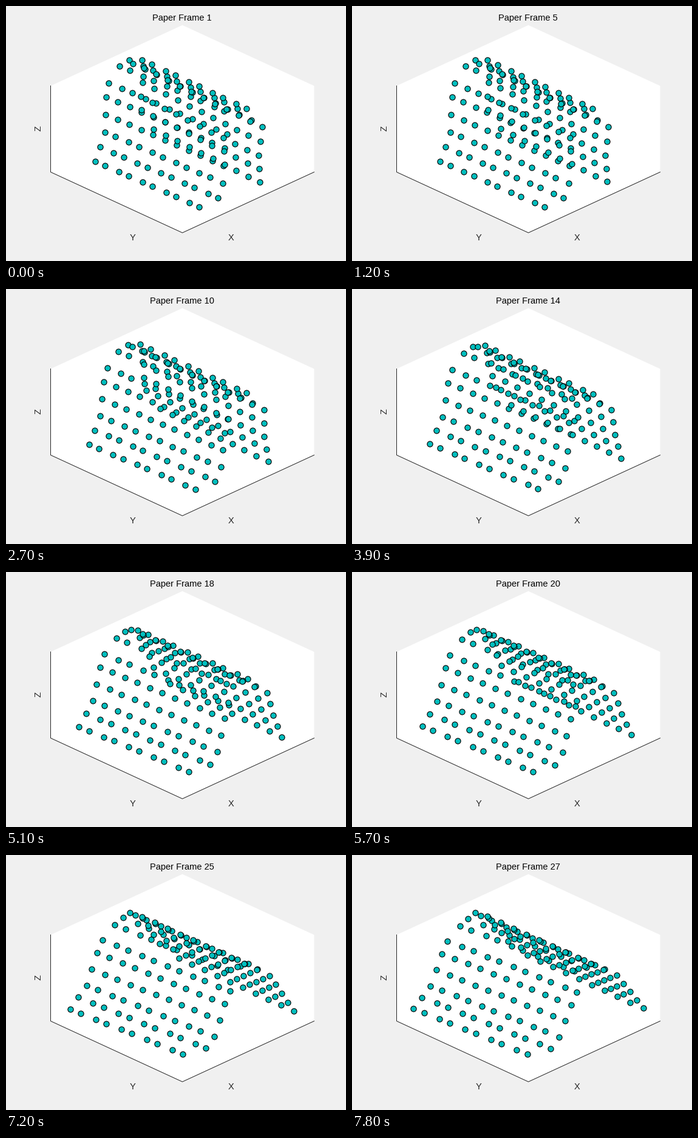
These frames come from a looping animation (560 px wide and 420 px high, 8000 ms). A matplotlib script:

```python
import numpy as np
import matplotlib.pyplot as plt
from matplotlib.animation import FuncAnimation

W, H, DPI = 560, 420, 100
PX = 72 / DPI  # one pixel in points
INK = "#262626"
ROWS = 15
RIDGE = ROWS // 2

# Key points of the sheet's two outer edges, folded and opened.
# The near slope hangs from its back edge, the far slope from its front edge.
BACK_ROWS = [0, 2, 4, 5, 6, 7]
BACK = np.array([
    [(147, 256), (163, 207), (165, 149), (169, 126), (187, 98), (203, 88)],
    [(101, 253), (129, 215), (148, 162), (157, 141), (178, 116), (191, 104)]])
FRONT_ROWS = [8, 9, 10, 12, 14]
FRONT = np.array([
    [(395, 168), (403, 188), (421, 199), (415, 246), (417, 290)],
    [(399, 180), (415, 188), (435, 198), (457, 225), (479, 252)]])


def mix(a, b, s):
    return a + (b - a) * s


def opening(step):
    """Slow start that runs into a steady rate; 0 is folded, 1 is open."""
    line = 1 - 0.0455 * (27 - step)
    return (line + np.sqrt(line * line + 0.0088)) / 2


def edge_point(row, key_rows, poses, s):
    keys = mix(poses[0], poses[1], s)
    return np.array([np.interp(row, key_rows, axis) for axis in keys.T])


def row_points(row, s):
    # The sheet's borders and ridge have one vertex less.
    last = 9 if abs(row - RIDGE) in (0, 1, RIDGE) else 10
    col = np.arange(last + 1)
    # Odd vertices pair up with a neighbour, the other way on every next row.
    slip = 0.17 * (-1) ** row * abs(np.cos(np.pi * row / RIDGE))
    if row > RIDGE + 1:
        slip = 0
    place = (col - slip * (col % 2)) / 10
    along = np.array([mix(194, 212, s), np.interp(row, [6, 10], [84, 97])])
    if row <= RIDGE:
        anchor = edge_point(row, BACK_ROWS, BACK, s)
    else:
        anchor = edge_point(row, FRONT_ROWS, FRONT, s)
        anchor[1] += 4 * s * (1 - s) * max(0, row - 10)  # sag while opening
        place = place - place[-1]
    return anchor + np.outer(place, along)


def vertices(step):
    s = opening(step)
    return np.vstack([row_points(row, s) for row in range(ROWS)])


plt.rcParams["font.family"] = "Liberation Sans"
fig = plt.figure(figsize=(W / DPI, H / DPI), dpi=DPI, facecolor="#f0f0f0")
ax = fig.add_axes([0, 0, 1, 1])
ax.set_xlim(-0.5, W - 0.5)
ax.set_ylim(H - 0.5, -0.5)
ax.axis("off")

ax.fill([290, 507, 507, 290, 73, 73], [31, 131, 273, 373, 273, 131],
        color="white", lw=0)
ax.plot([73, 73, 290, 507], [131, 273, 373, 273], color=INK, lw=PX)


def label(x, y, text, color=INK, **kw):
    return ax.text(x, y, text, color=color, fontsize=14.67 * PX,
                   ha="center", **kw)


label(370, 386, "X", va="baseline")
label(208, 386, "Y", va="baseline")
label(53, 201, "Z", va="center", rotation=90)
title = label(289.5, 24, "", color="black", va="baseline")
dots, = ax.plot([], [], "o", ms=9.2 * PX, mfc=(0, .75, .75), mec="black",
                mew=1.15 * PX)


def update(tick):
    step = tick // 3 + 1
    title.set_text(f"Paper Frame {step}")
    dots.set_data(*vertices(step).T)
    return title, dots


anim = FuncAnimation(fig, update, frames=80, interval=100, repeat=True,
                     repeat_delay=0, blit=False)
plt.show()
```
